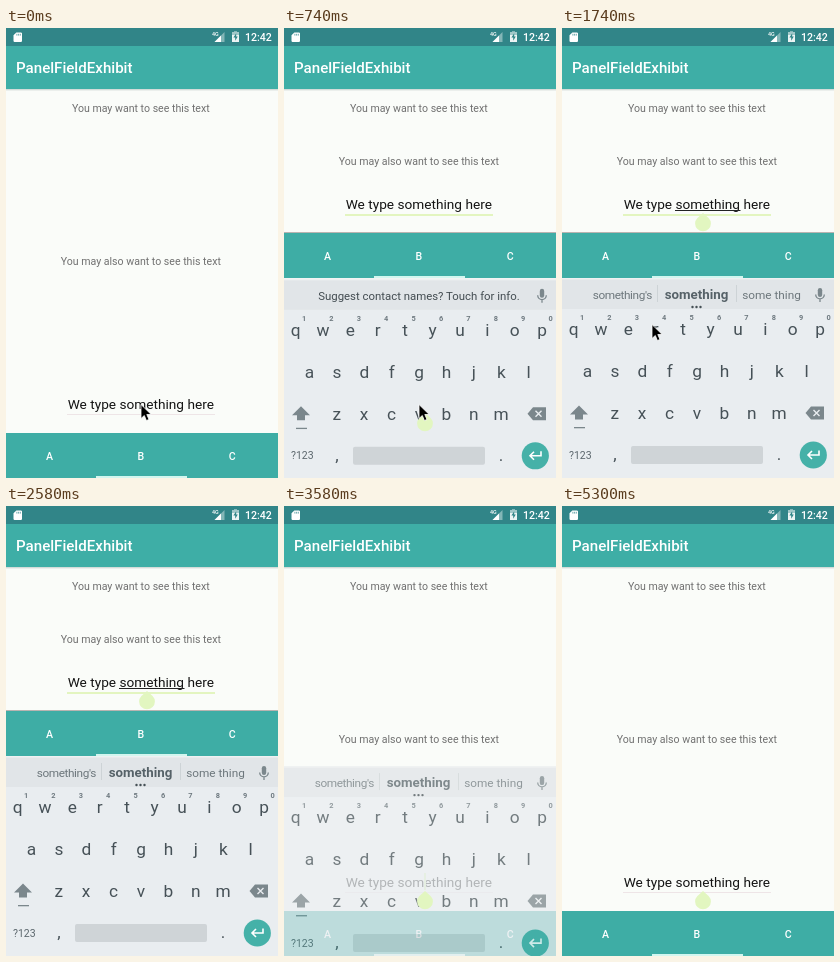
Write an HTML page that moves like this. It is 272 px wide and 450 px high and loops after 5.4 s.

```html
<!DOCTYPE html>
<html lang="en">
<head>
<meta charset="utf-8">
<title>Keyboard and tab bar</title>
<style>
  html, body { margin: 0; width: 100%; height: 100%; overflow: hidden; background: #fafcf9; }
  svg { display: block; width: 272px; height: 450px; font-family: Roboto, sans-serif; }
  .mid text, text.mid { text-anchor: middle; }
  .medium { font-weight: 500; }
</style>
</head>
<body>
<svg viewBox="0 0 272 450">
  <rect width="272" height="450" fill="#fafcf9"/>

  <g class="mid" font-size="10.58" fill="#707070">
    <text x="134.8" y="84">You may want to see this text</text>
    <text id="also" x="134.8" y="237">You may also want to see this text</text>
  </g>

  <g id="bottom">
    <text class="mid" x="134.8" y="381" font-size="13.66" fill="#141414">We type something here</text>
    <rect id="composing" x="113" y="382" width="65.5" height="1" fill="#222"/>
    <rect id="line" x="61" y="386" width="148"/>
    <rect id="caret" x="140" y="367" width="2" height="17" fill="#e0f6ba"/>
    <rect y="405" width="272" height="45" fill="#3eada5"/>
    <rect id="edge" y="404" width="272" height="1" fill="#b9b4b1"/>
    <g class="mid medium" font-size="10.58" fill="#fff">
      <text x="43.5" y="432">A</text>
      <text x="134.8" y="432">B</text>
      <text x="226.2" y="432">C</text>
    </g>
    <rect x="90" y="448" width="91" height="2" fill="#d2f6ef"/>
  </g>

  <rect y="61" width="272" height="1" fill="#d3dcd9"/>
  <rect y="62" width="272" height="1" fill="#ebefec"/>
  <rect y="18" width="272" height="43" fill="#3eaea6"/>
  <rect width="272" height="18" fill="#318588"/>
  <text class="medium" x="10" y="45" font-size="15.1" fill="#fff">PanelFieldExhibit</text>
  <g fill="#fff">
    <path d="M10.3 4.5H15.2L16 5.3V13.2L15.2 14H8.3L7.5 13.2V7.3Z"/>
    <path d="M10.9 5.8V7.6M12.6 5.8V7.6M14.3 5.8V7.6" stroke="#318588" stroke-width=".7"/>
    <path d="M218.5 4V14H208.5Z" opacity=".4"/>
    <path d="M215 7.5V14H208.5Z"/>
    <text class="medium" x="206" y="8.3" font-size="5.4">4G</text>
    <path d="M228 4V3.2H231V4H233V14H226V4Z" opacity=".55"/>
    <path d="M226 7H233V14H226Z" opacity=".8"/>
    <path d="M230.2 5.3L227.4 9.6H229.2V12.7L231.8 8.4H230.2Z" fill="#318588"/>
    <text class="medium" x="239" y="13" font-size="10.58">12:42</text>
  </g>

  <g id="keyboard">
    <rect y="250" width="272" height="222" fill="#e9edf0"/>
    <rect y="250" width="272" height="31" fill="#e1e5e8"/>
    <rect y="250" width="272" height="1.5" fill="#eef1f2"/>
    <text id="hint" class="mid" x="135" y="271.5" font-size="11.4" fill="#424b50">Suggest contact names? Touch for info.</text>
    <g id="words" class="mid" font-size="11.8" fill="#6d777c">
      <text x="60.3" y="271" letter-spacing="-.4">something's</text>
      <text x="134.5" y="271" font-size="13.3" font-weight="700" fill="#566268">something</text>
      <text x="209.5" y="271">some thing</text>
      <path d="M95.5 257V274M174.5 257V274" stroke="#cdd3d6"/>
      <path d="M130.5 279h.01M134.5 279h.01M138.5 279h.01" stroke="#455055" stroke-width="2.4" stroke-linecap="round"/>
    </g>
    <g fill="#7b878c">
      <rect x="255.8" y="260" width="4.4" height="9" rx="2.2"/>
      <path d="M253.7 266.5a4.3 4.3 0 0 0 8.6 0M258 271V274" fill="none" stroke="#7b878c" stroke-width="1.3"/>
      <path d="M17 377.5L26 386.5H21V391.5H13V386.5H8Z"/>
      <rect x="12" y="399" width="11" height="1.3"/>
      <path d="M249 378.5H262V391.5H249L243.5 385Z"/>
      <path d="M251.5 382l6 6m0 -6l-6 6" stroke="#e9edf0" stroke-width="1.4"/>
    </g>
    <g id="keys" class="mid" font-size="17.3" fill="#465157"></g>
    <text x="7" y="430.5" font-size="10.5" fill="#5b666c">?123</text>
    <rect x="69" y="418" width="132" height="18" rx="2" fill="#cfd4d7"/>
    <circle cx="251.3" cy="427" r="13.6" fill="#45b1a8"/>
    <path d="M257 422.5V427H246M250 423L246 427L250 431" fill="none" stroke="#fff" stroke-width="1.6"/>
  </g>

  <path id="handle" d="M0 -10.5L5.6 -5.6A7.9 7.9 0 1 1 -5.6 -5.6Z" fill="#e2f6c0"/>
  <path id="mouse" d="M0 0V14L3.3 11L5.4 16L8 15L5.8 10H10.2Z" fill="#000" stroke="#fff" stroke-width=".8"/>
</svg>
<script>
const LOOP = 5400;
const $ = id => document.getElementById(id);
const set = (id, attrs) => {
  for (const k in attrs) $(id).setAttribute(k, attrs[k]);
};
const move = (id, x, y) => set(id, { transform: `translate(${x} ${y})` });
const show = (id, on) => set(id, { visibility: on ? 'visible' : 'hidden' });
const during = (t, ...spans) => spans.some(([a, b]) => t >= a && t < b);
const progress = (t, a, b) => Math.min(1, Math.max(0, (t - a) / (b - a)));

function addKey(label, x, y, attrs = {}) {
  const el = document.createElementNS('http://www.w3.org/2000/svg', 'text');
  el.textContent = label;
  for (const [k, v] of Object.entries({ x, y, ...attrs })) el.setAttribute(k, v);
  $('keys').append(el);
}
const PITCH = 27.4;
[['qwertyuiop', 11.6, 307], ['asdfghjkl', 25.5, 349], ['zxcvbnm', 52.7, 391]].forEach(([row, x, y]) =>
  [...row].forEach((c, i) => addKey(c, x + i * PITCH, y)));
[...'1234567890'].forEach((c, i) =>
  addKey(c, 20 + i * PITCH, 292, { 'font-size': 7.4, 'font-weight': 700, fill: '#6f7a80' }));
addKey(',', 53, 432);
addKey('.', 217, 432);

// time, x, y of the pointer tip
const PATH = [[0, 135, 376.5], [1360, 135, 376.5], [1740, 90, 296.5], [1900, 77, 298], [2260, 150, 452]];
function pointer(t) {
  const i = Math.max(1, PATH.findIndex(p => p[0] > t));
  const [a, b] = [PATH[i - 1], PATH[i]];
  const p = progress(t, a[0], b[0]), e = p * p * (3 - 2 * p);
  return [a[1] + (b[1] - a[1]) * e, a[2] + (b[2] - a[2]) * e];
}

function draw(t) {
  const raised = during(t, [720, 3520]);
  move('also', 0, raised ? -100 : 0);
  move('bottom', 0, raised ? -200 : 0);
  set('line', raised ? { height: 2, fill: '#e3f5c0' } : { height: 1, fill: '#eee5e7' });
  show('edge', raised);
  show('caret', during(t, [260, 720], [800, 1580], [2080, 2580], [3060, 4080], [4680, 5300]));

  const suggesting = t >= 820;
  show('composing', raised && suggesting);
  show('hint', !suggesting);
  show('words', suggesting);

  const enter = progress(t, 580, 780), leave = progress(t, 3480, 3680);
  move('keyboard', 0, 20 * (1 - enter) ** 2 + 20 * leave);
  set('keyboard', { opacity: (1 - (1 - enter) ** 3) * (1 - leave * leave) });

  show('handle', t >= 580);
  move('handle', 141, during(t, [780, 3540]) ? 195.5 : 395.5);

  show('mouse', t < 2260);
  if (t < 2260) move('mouse', ...pointer(t));
}

function tick() {
  draw(performance.now() % LOOP);
  requestAnimationFrame(tick);
}
tick();
</script>
</body>
</html>
```
